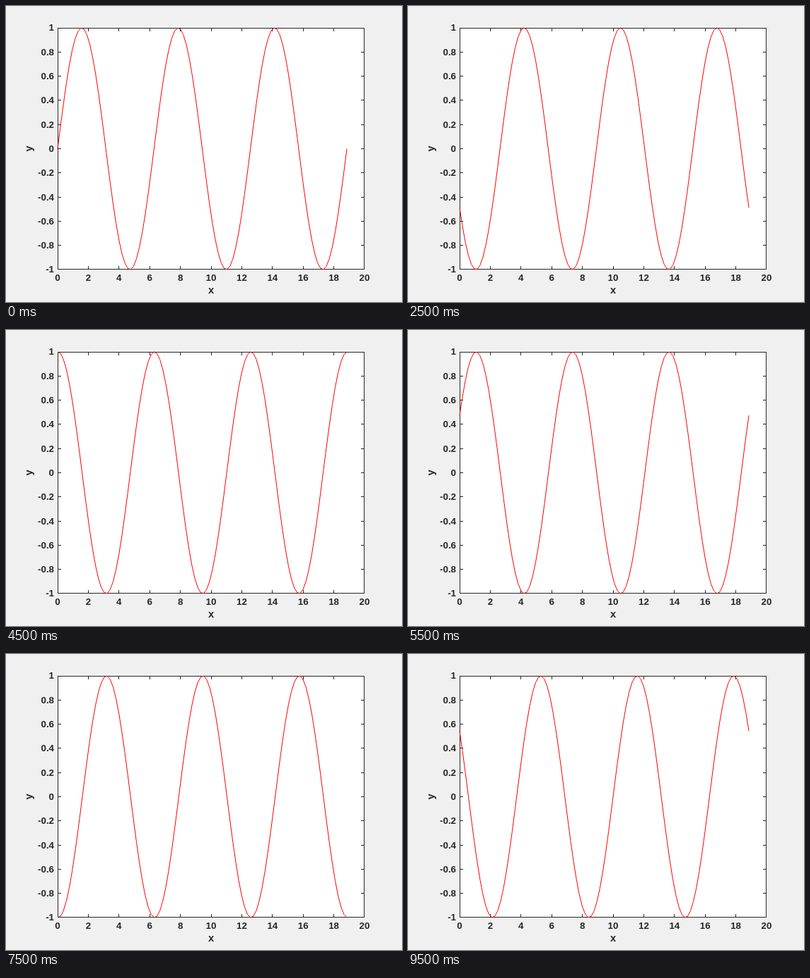
An HTML page for the animation above (10 s loop, 560x420 px).

```html
<!DOCTYPE html>
<html lang="en">
<head>
<meta charset="utf-8">
<title>Travelling sine wave</title>
<style>
  html, body { margin: 0; width: 100%; height: 100%; overflow: hidden; background: #f0f0f0; }
  svg { display: block; }
  text { font: bold 13.33px "Liberation Sans", Arial, sans-serif; fill: #262626; text-anchor: middle; }
  .tick-y { text-anchor: end; }
  .name { font-size: 14.67px; }
  #axes { fill: none; stroke: #262626; shape-rendering: crispEdges; }
  #wave { fill: none; stroke: #f00; stroke-linejoin: round; }
</style>
</head>
<body>
<svg width="560" height="420" viewBox="0 0 560 420">
  <rect x="73" y="31" width="434" height="343" fill="#fff"/>
  <path id="axes"/>
  <g id="labels"></g>
  <text class="name" x="290" y="408">x</text>
  <text class="name" transform="translate(37 202.5) rotate(-90)">y</text>
  <polyline id="wave"/>
</svg>
<script>
const LEFT = 73, RIGHT = 507, TOP = 31, BOTTOM = 374, TICK = 5;
const POINTS = 100, STEPS = 20, STEP_MS = 500;
const get = id => document.getElementById(id);
const px = x => LEFT + x / 20 * (RIGHT - LEFT);
const py = y => (TOP + BOTTOM) / 2 - y * (BOTTOM - TOP) / 2;

function label(str, x, y, cls = '') {
  const el = document.createElementNS('http://www.w3.org/2000/svg', 'text');
  el.setAttribute('x', x);
  el.setAttribute('y', y);
  el.setAttribute('class', cls);
  el.textContent = str;
  get('labels').append(el);
}

function drawAxes() {
  let d = `M${LEFT + .5} ${TOP + .5}H${RIGHT - .5}V${BOTTOM - .5}H${LEFT + .5}Z`;
  for (let i = 0; i <= 10; i++) {
    const x = Math.min(Math.floor(px(2 * i)), RIGHT - 1) + .5;
    const value = (i - 5) / 5;
    const y = Math.min(Math.floor(py(value)), BOTTOM - 1) + .5;
    d += `M${x} ${TOP}v${TICK}M${x} ${BOTTOM}v${-TICK}`;
    d += `M${LEFT} ${y}h${TICK}M${RIGHT} ${y}h${-TICK}`;
    label(2 * i, px(2 * i), 390);
    label(value, 68, Math.round(py(value) + 4.4), 'tick-y');
  }
  get('axes').setAttribute('d', d);
}

function drawWave(phase) {
  const pts = Array.from({ length: POINTS }, (_, i) => {
    const x = 6 * Math.PI * i / (POINTS - 1);
    return `${px(x).toFixed(2)},${py(Math.sin(x - phase)).toFixed(2)}`;
  });
  get('wave').setAttribute('points', pts.join(' '));
}

// The phase runs from 0 to 10 in equal held steps.
function frame() {
  const step = Math.floor(performance.now() / STEP_MS) % STEPS;
  drawWave(10 * step / (STEPS - 1));
  requestAnimationFrame(frame);
}

drawAxes();
frame();
</script>
</body>
</html>
```
